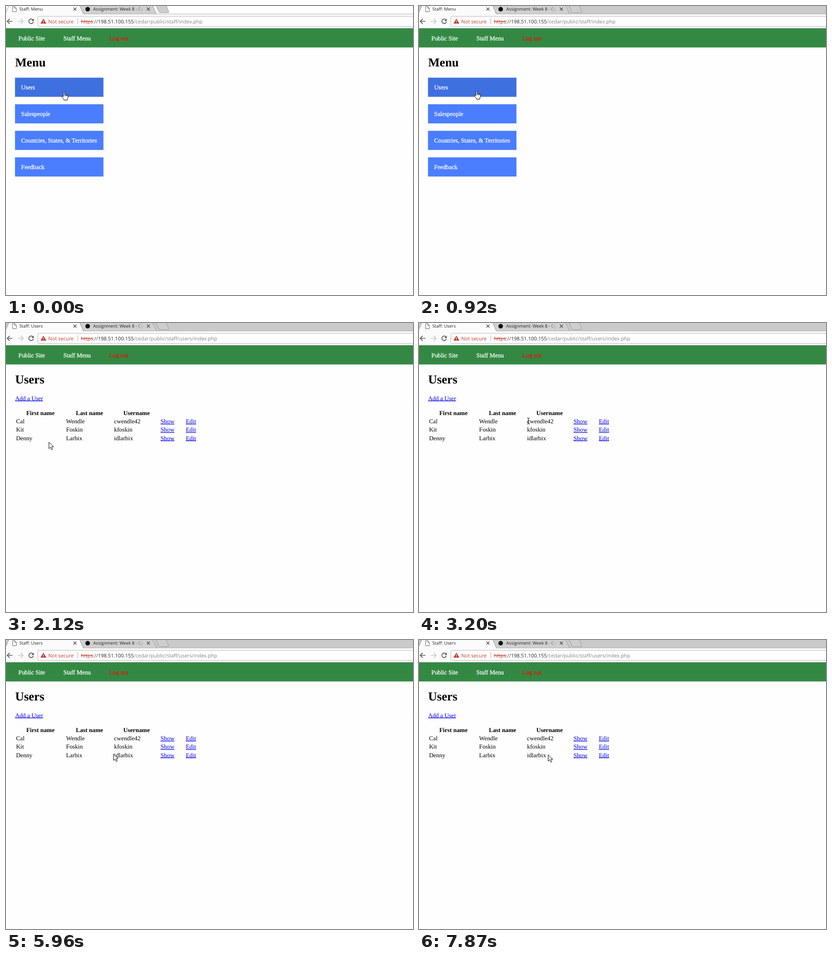
An HTML page for the animation above (8 s loop, 887 by 631 pixels).

```html
<!DOCTYPE html>
<html lang="en">
<head>
<meta charset="utf-8">
<title>Staff area</title>
<style>
html, body { margin: 0; width: 100%; height: 100%; overflow: hidden; background: #fefefe; }
svg { display: block; width: 887px; height: 631px; }
text { text-rendering: geometricPrecision; white-space: pre; }
.page { font: 13.3px "Liberation Serif", serif; }
.page .h1 { font-size: 26.6px; font-weight: bold; }
.page .th { font-weight: bold; text-anchor: middle; }
.ui { font: 9.6px "Open Sans", sans-serif; fill: #222; }
.ui .bar { font-size: 11px; }
.link { fill: #0000ee; text-decoration: underline; }
.light { fill: #fff; stroke: #fff; stroke-width: .3; }
.alert { fill: #e8140c; stroke: #e8140c; stroke-width: .3; }
#picked text { fill: #fff; }
</style>
</head>
<body>
<svg viewBox="0 0 887 631">
  <defs>
    <linearGradient id="fade" gradientUnits="userSpaceOnUse" x1="282" x2="300">
      <stop stop-color="#222"/><stop offset="1" stop-color="#222" stop-opacity="0"/>
    </linearGradient>
    <clipPath id="range"></clipPath>
  </defs>
  <rect width="887" height="631" fill="#fefefe"/>

  <g class="ui">
    <rect id="strip" width="887" height="18"/>
    <path d="M160 0H318Q321 0 322 3L328 17.5H168Z" fill="#d0d0d0"/>
    <path d="M319 0L321 2 327 15Q328 17.5 330 17.5" fill="none" stroke="#9a9a9a"/>
    <path d="M327.5 -.5H347Q349.5 -.5 350.5 2L354.5 12Q355 14.5 353 14.5H336Q333.5 14.5 332.5 12Z" fill="#cecece" stroke="#9a9a9a"/>
    <rect y="17" width="887" height="32" fill="#fbfbfb"/>
    <path d="M168 17.5H887" stroke="#b0b0b0"/>
    <path d="M0 18V14L6 0H161L168 18Z" fill="#fbfbfb"/>
    <path d="M0 14L6 0M161 0L167 14Q168 17.5 170 17.5" fill="none" stroke="#9a9a9a"/>
    <path d="M14.5 1.5H19L22.5 5V12.5H14.5ZM19 1.5V5H22.5" fill="#fff" stroke="#666"/>
    <text id="tabTitle" x="29" y="10"></text>
    <circle cx="178" cy="7" r="5" fill="#111"/>
    <text x="190" y="10" fill="url(#fade)">Assignment: Week 8 - Cy</text>
    <path d="M147 3.5L153.5 10M153.5 3.5L147 10M307 3.5L313.5 10M313.5 3.5L307 10" stroke="#444" stroke-width="1.3"/>

    <path d="M14 33.5H3M8 28.2L2.7 33.5 8 38.8" fill="none" stroke="#555" stroke-width="1.7"/>
    <path d="M26 33.5H37M32 28.2L37.3 33.5 32 38.8" fill="none" stroke="#c8c8c8" stroke-width="1.7"/>
    <path d="M58.5 30A5 5 0 1 0 59.7 34.5" fill="none" stroke="#555" stroke-width="1.7"/>
    <path d="M60.5 27.5V32.7H55.3Z" fill="#555"/>
    <rect x="69.5" y="22.5" width="830" height="22" rx="2" fill="#fff" stroke="#b8b8b8"/>
    <path d="M81.5 27.5L88 38.5H75Z" fill="#c5392b"/>
    <path d="M81.5 31V35M81.5 36V37.3" stroke="#fff" stroke-width="1.2"/>
    <g class="bar">
      <text x="92" y="37.5" fill="#c5392b">Not secure</text>
      <path d="M156.5 27V40" stroke="#aaa"/>
      <text x="163" y="37.5"><tspan fill="#c5392b" text-decoration="line-through">https</tspan><tspan fill="#444">://</tspan><tspan fill="#222">198.51.100.155</tspan><tspan id="path" fill="#808080"></tspan></text>
    </g>
    <path d="M0 48.5H887" stroke="#b5b5b5"/>
  </g>

  <g class="page">
    <rect y="49" width="887" height="41.5" fill="#338943"/>
    <text class="light" x="27" y="75">Public Site</text>
    <text class="light" x="125" y="75">Staff Menu</text>
    <text class="alert" x="225" y="75">Log out</text>
    <text id="heading" class="h1" x="20" y="132"></text>
    <g id="menu"></g>
    <g id="users">
      <text class="link" x="20" y="168.5">Add a User</text>
      <g id="table"></g>
      <g id="picked" clip-path="url(#range)"><rect x="20" y="200" width="400" height="62" fill="#3390ff"/></g>
    </g>
  </g>

  <g id="cursor" stroke="#000" stroke-linejoin="round">
    <path id="hand" fill="#fff" d="M-1.5 10V1.5Q0-.8 1.5 1.5V5.8Q3 4.6 4.2 6.2Q5.6 5.2 6.6 6.8Q8.2 6.2 8.6 8V12L7 15V17.5H-.5V15.5L-5 10Q-4.5 7.8-2.8 9ZM1.5 5.8V9M4.2 6.2V9M6.6 6.8V9"/>
    <path id="arrow" fill="#fff" d="M0 0V14L3.2 11 5.5 16.3 8 15.2 5.7 10H10Z"/>
    <path id="beam" fill="none" d="M-3-6.5H-1L0-6 1-6.5H3M0-6V6M-3 6.5H-1L0 6 1 6.5H3"/>
  </g>
</svg>
<script>
const LOOP = 8000;
const $ = id => document.getElementById(id);

function add(parent, tag, attrs, content = '') {
  const el = document.createElementNS('http://www.w3.org/2000/svg', tag);
  for (const key in attrs) el.setAttribute(key, attrs[key]);
  el.textContent = content;
  parent.append(el);
  return el;
}

const buttons = ['Users', 'Salespeople', 'Countries, States, & Territories', 'Feedback'].map((label, i) => {
  const y = 156.5 + 58 * i;
  const box = add($('menu'), 'rect', { x: 19.6, y, width: 192.8, height: 41.8, fill: '#4a7dff' });
  add($('menu'), 'text', { x: 33, y: y + 25.5, class: 'light' }, label);
  return box;
});

const columns = [22, 131, 235.5, 336.7, 392];
const rowY = row => 219 + 18.3 * row;
[['First name', 75], ['Last name', 182], ['Username', 284.5]].forEach(([label, x]) =>
  add($('table'), 'text', { x, y: 201, class: 'th' }, label));
[
  ['Cal', 'Wendle', 'cwendle42'],
  ['Kit', 'Foskin', 'kfoskin'],
  ['Denny', 'Larbix', 'idlarbix']
].forEach((person, row) => [...person, 'Show', 'Edit'].forEach((label, col) => {
  const attrs = { x: columns[col], y: rowY(row), class: col > 2 ? 'link' : '' };
  add($('table'), 'text', attrs, label);
  add($('picked'), 'text', attrs, label);
}));

// Pointer moves: first step, last step, number of steps, points passed
const home = [126.5, 188];
const moves = [
  [280, 280, 1, [[125.5, 186]]],
  [1440, 2400, 8, [[49.5, 278], [226, 207]]],
  [2550, 3200, 6, [[221, 210], [238.5, 214]]],
  [3600, 3720, 2, [[309.5, 215]]],
  [4000, 4000, 1, [[309.5, 216.5]]],
  [4280, 4580, 3, [[246, 236]]],
  [4730, 4730, 1, [[244, 240]]],
  [5010, 5680, 6, [[240, 262], [247, 253]]],
  [5960, 5960, 1, [[234.5, 249]]],
  [6360, 7340, 8, [[270, 228], [285, 249.5]]],
  [7870, 7870, 1, [[281.5, 250.5]]]
];
const shapes = [
  [0, 'hand'], [1440, 'arrow'], [2930, 'beam'], [3720, 'arrow'], [4430, 'beam'],
  [5960, 'arrow'], [6360, 'beam'], [6900, 'arrow']
];

function pointer(t) {
  let from = home;
  for (const [start, end, steps, points] of moves) {
    if (t < start) break;
    const gap = (end - start) / Math.max(1, steps - 1);
    const done = t >= end ? steps : Math.floor((t - start) / gap) + 1;
    const route = [from, ...points];
    const place = done / steps * points.length;
    const leg = Math.min(points.length - 1, Math.floor(place));
    const [a, b] = [route[leg], route[leg + 1]];
    from = a.map((v, i) => v + (b[i] - v) * (place - leg));
  }
  return from;
}

// Selected spans as [row, left, right]
function selection(t, x) {
  if (t >= 3600 && t < 3720) return [[0, 235, x]];
  if (t >= 3720 && t < 4730) return [[0, 235, 293.5]];
  if (t >= 6360 && t < 6780) return [[2, 235, Math.min(x, 277)]];
  if (t >= 6780 && t < 7590) return [[1, 336.5, 367.5], [1, 392, 415], [2, 22, 58], [2, 131, 166.5]];
  return [];
}

function show(id, on) {
  $(id).setAttribute('display', on ? 'inline' : 'none');
}

function render(t) {
  const onMenu = t < 1050;
  const name = onMenu ? 'Menu' : 'Users';
  $('heading').textContent = name;
  $('tabTitle').textContent = 'Staff: ' + name;
  $('path').textContent = `/cedar/public/staff/${onMenu ? '' : 'users/'}index.php`;
  show('menu', onMenu);
  show('users', !onMenu);
  buttons[0].setAttribute('fill', t >= 780 && t < 920 ? '#3564c8' : '#3f70e0');
  $('strip').setAttribute('fill', t < 780 ? '#fefefe' : '#cacaca');

  const [x, y] = pointer(t);
  $('cursor').setAttribute('transform', `translate(${x} ${y})`);
  const shape = shapes.filter(([from]) => t >= from).pop()[1];
  ['hand', 'arrow', 'beam'].forEach(id => show(id, id === shape));

  $('range').replaceChildren();
  for (const [row, left, right] of selection(t, x))
    add($('range'), 'rect', { x: left, y: rowY(row) - 12, width: right - left, height: 15 });
}

const begin = performance.now();
function tick() {
  render((performance.now() - begin) % LOOP);
  requestAnimationFrame(tick);
}
tick();
</script>
</body>
</html>
```
